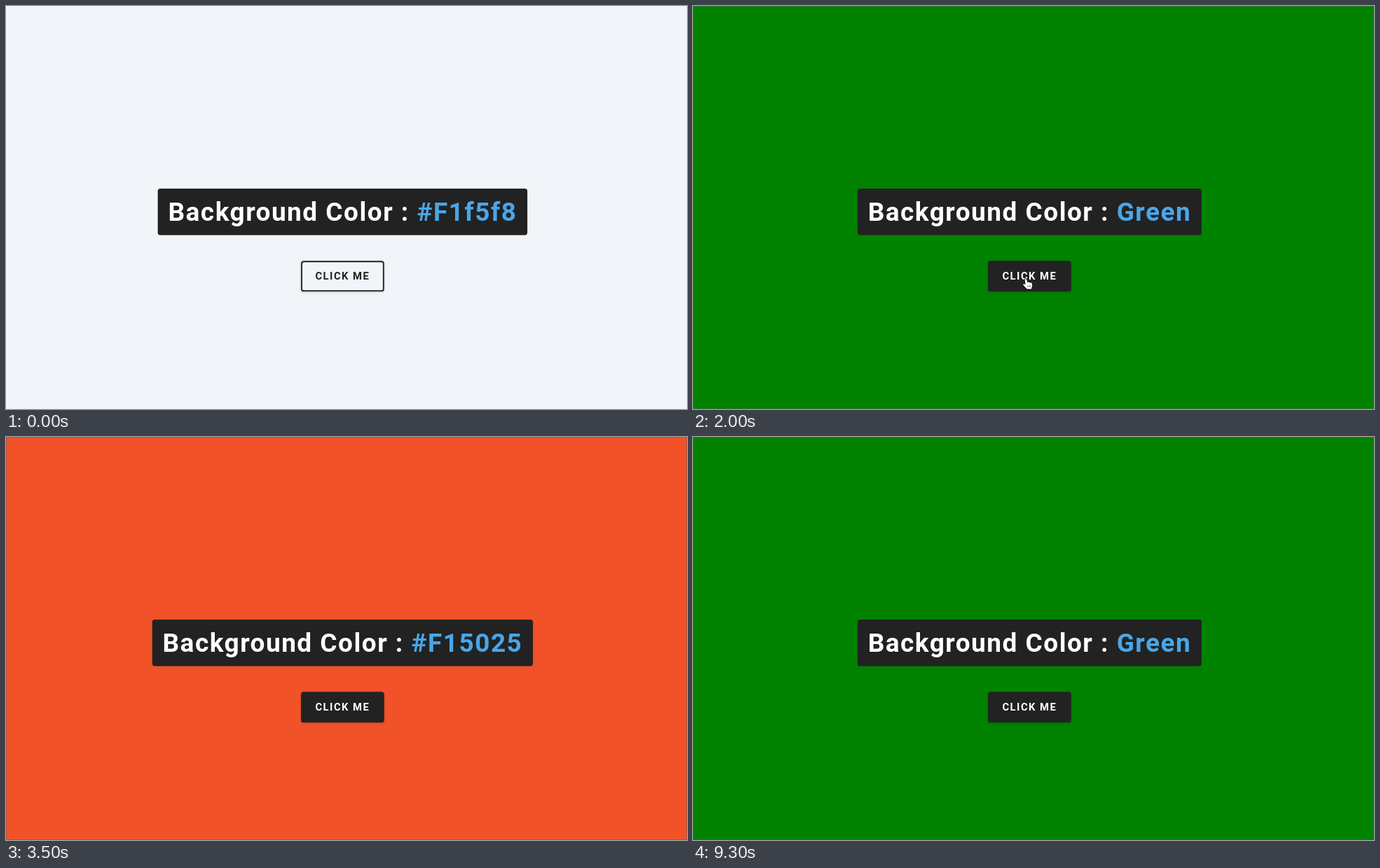
Write an HTML page with a canvas that moves like this. It is 972 by 576 pixels and loops after 10000 ms.

```html
<!DOCTYPE html>
<html lang="en">
<head>
<meta charset="utf-8">
<title>Color flipper</title>
<style>
  html, body { margin: 0; width: 100%; height: 100%; overflow: hidden; background: #f1f4f9; }
  canvas { display: block; }
</style>
</head>
<body>
<canvas id="stage" width="972" height="576"></canvas>
<script>
const ctx = document.getElementById('stage').getContext('2d');
const LOOP = 10000;
const REM = 14.8;
const CENTER = 480.4;
const DARK = '#222222';
const BLUE = '#49a6e9';
const SPACING = REM * 0.1;
const HEADING = { top: 261, height: 66.4, baseline: 306.9 };
const BUTTON = { x: 421.1, y: 364.3, w: 118.6, h: 43.8 };
const LABEL = 'Background Color : ';

const scenes = [
  { at: 0, name: '#F1f5f8', fill: '#f1f4f9' },
  { at: 2000, name: 'Green', fill: '#008200' },
  { at: 3500, name: '#F15025', fill: '#f15228' },
  { at: 5000, name: 'Green', fill: '#008200' },
  { at: 6400, name: 'Red', fill: '#ff0000' },
  { at: 9300, name: 'Green', fill: '#008200' }
];

const clamp = v => Math.max(0, Math.min(1, v));
const mix = (a, b, p) => a + (b - a) * p;
const gray = v => `rgb(${v},${v},${v})`;

function roundRect(x, y, w, h, r) {
  ctx.beginPath();
  ctx.roundRect(x, y, w, h, r);
}

function shadow(on) {
  ctx.shadowColor = on ? 'rgba(0,0,0,0.25)' : 'transparent';
  ctx.shadowBlur = on ? 3 : 0;
  ctx.shadowOffsetY = on ? 1 : 0;
}

function setFont(size) {
  ctx.font = `bold ${size}px Roboto, sans-serif`;
  ctx.letterSpacing = SPACING + 'px';
  ctx.textAlign = 'left';
}

function drawHeading(name) {
  setFont(REM * 2.5);
  const labelWidth = ctx.measureText(LABEL).width;
  const width = labelWidth + ctx.measureText(name).width + REM * 2;
  const x = CENTER - width / 2;
  ctx.fillStyle = DARK;
  roundRect(x, HEADING.top, width, HEADING.height, REM / 4);
  ctx.fill();
  ctx.fillStyle = '#fff';
  ctx.fillText(LABEL, x + REM, HEADING.baseline);
  ctx.fillStyle = BLUE;
  ctx.fillText(name, x + REM + labelWidth, HEADING.baseline);
}

function drawButton(hover, fill) {
  const { x, y, w, h } = BUTTON;
  const border = 1.85;
  shadow(true);
  ctx.fillStyle = DARK;
  roundRect(x, y, w, h, REM / 4);
  ctx.fill();
  shadow(false);
  if (hover < 1) {
    ctx.globalAlpha = 1 - hover;
    ctx.fillStyle = fill;
    roundRect(x + border, y + border, w - border * 2, h - border * 2, 2);
    ctx.fill();
    ctx.globalAlpha = 1;
  }
  setFont(REM);
  const textWidth = ctx.measureText('CLICK ME').width;
  ctx.fillStyle = gray(Math.round(mix(34, 255, hover)));
  ctx.fillText('CLICK ME', x + (w - textWidth) / 2, 391.1);
}

function paintCursor(path, x, y, fill, line) {
  ctx.save();
  ctx.translate(x, y);
  ctx.lineJoin = 'round';
  ctx.lineWidth = 1.6;
  ctx.strokeStyle = line;
  ctx.stroke(path);
  ctx.fillStyle = fill;
  ctx.fill(path);
  ctx.restore();
}

const arrow = new Path2D('M0 0 V14 L3.3 11 L5.6 16 L7.8 15 L5.6 10.2 H10 Z');
const hand = new Path2D(
  'M-1.4 1 Q0 -0.8 1.2 1 L2.3 5.2 Q3.6 4 4.6 5.3 Q5.9 4.3 6.8 5.7 ' +
  'Q8.4 5 8.9 7 L9.2 10.5 L7.9 14.5 H1.8 L-1.2 11.6 L-4 8.3 Q-3.4 6.6 -1.6 7.6 L-0.4 8.4 Z');
const knuckles = new Path2D('M2.7 9 V12 M4.7 9 V12 M6.6 9 V12');

function drawCursor(t) {
  if (t < 600 || t >= 3100) return;
  const p = clamp((t - 600) / 600);
  const ease = p * p * (3 - 2 * p);
  const x = mix(33, 475, ease);
  const y = mix(558, 390, ease);
  const inside = x > BUTTON.x && y < BUTTON.y + BUTTON.h;
  if (!inside) {
    paintCursor(arrow, x, y, '#111', '#fff');
    return;
  }
  paintCursor(hand, x, y, '#fff', '#111');
  ctx.save();
  ctx.translate(x, y);
  ctx.strokeStyle = '#333';
  ctx.lineWidth = 0.6;
  ctx.stroke(knuckles);
  ctx.restore();
}

function draw(time) {
  // The opening movement advances in tenths of a second.
  const t = Math.floor((time % LOOP) / 100) * 100;
  const scene = scenes.findLast(s => t >= s.at);
  ctx.fillStyle = scene.fill;
  ctx.fillRect(0, 0, 972, 576);
  if (scene.at > 0) {
    ctx.strokeStyle = 'rgba(90,90,90,0.5)';
    ctx.lineWidth = 1;
    ctx.strokeRect(0.5, 0.5, 971, 575);
  }
  drawHeading(scene.name);
  drawButton(clamp((t - 1100) / 300), scene.fill);
  drawCursor(t);
}

let start;
function tick(now) {
  start ??= now;
  draw(now - start);
  requestAnimationFrame(tick);
}
draw(0);
requestAnimationFrame(tick);
</script>
</body>
</html>
```
